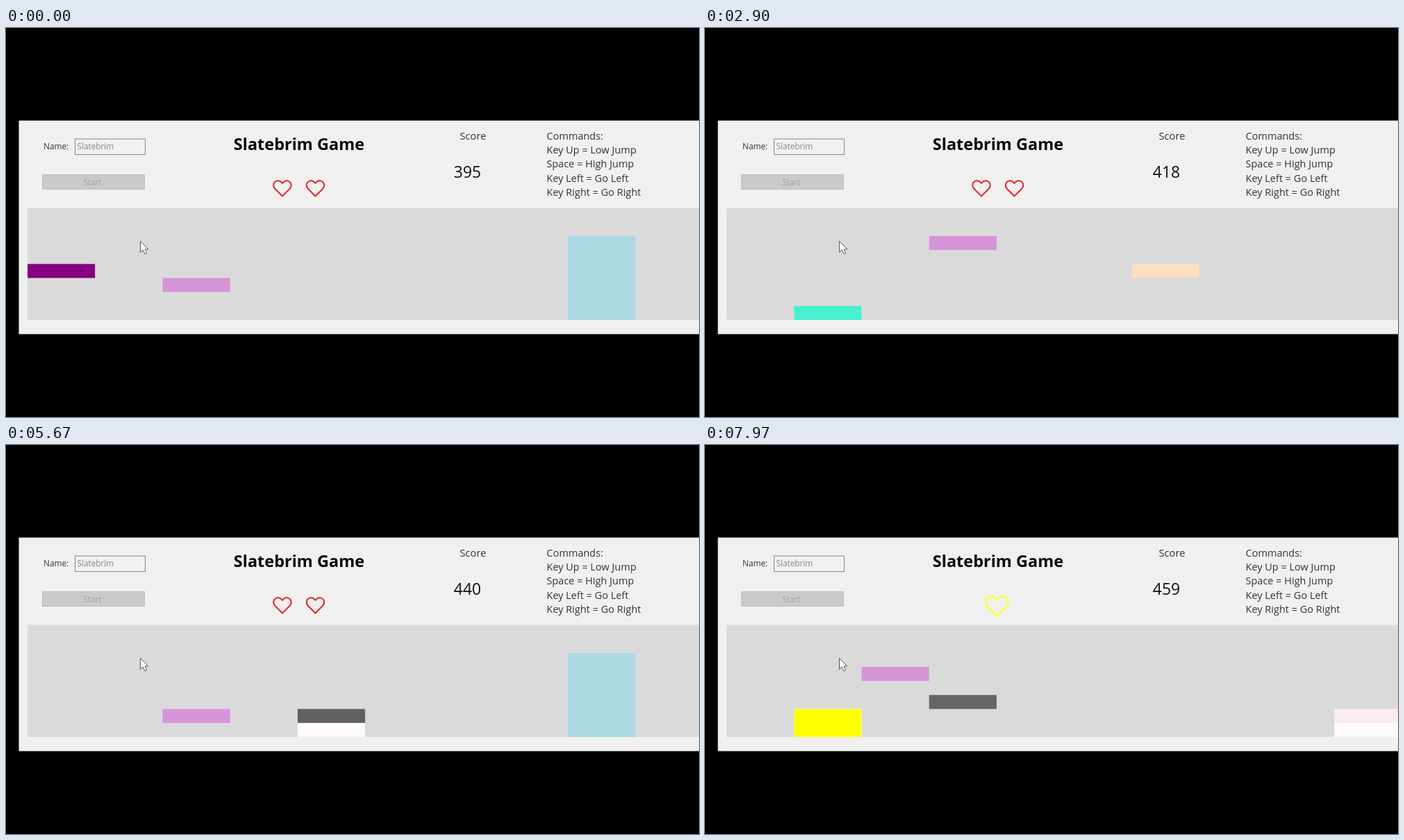
Recreate the animation shown at these times as an HTML page. Size 998 px wide and 561 px high, loop 8000 ms.

```html
<!DOCTYPE html>
<html lang="en">
<head>
<meta charset="utf-8">
<title>Slatebrim Game</title>
<style>
  html, body { margin: 0; width: 100%; height: 100%; overflow: hidden; background: #000; }
  svg { display: block; width: 100%; height: 100%; }
  text { font-family: "Open Sans", "Noto Sans", sans-serif; fill: #333; }
</style>
</head>
<body>
<svg viewBox="0 0 998 561">
  <defs>
    <path id="heart" d="M0 11.5 L-11 .5 C-17 -7 -6.500 -16 0 -7 C6.500 -16 17 -7 11 .5 Z"
      fill="none" stroke-width="2" stroke-linejoin="round"/>
  </defs>
  <rect width="998" height="561"/>
  <rect x="18.500" y="133.500" width="980" height="308" fill="#f0f0f0"/>

  <text x="54" y="175" font-size="11.800">Name:</text>
  <rect x="99.500" y="160" width="101" height="22.500" fill="#f1f1f1" stroke="#858590"/>
  <text x="102.500" y="175" font-size="11.800" style="fill:#858585">Slatebrim</text>
  <rect x="52.500" y="211.500" width="147" height="21" fill="#cacaca" stroke="#bdbdbd"/>
  <text x="124.500" y="227" font-size="11.800" text-anchor="middle" style="fill:#a2a2a2">Start</text>

  <text x="422" y="176" font-size="23.500" font-weight="700" text-anchor="middle" style="fill:#080808">Slatebrim Game</text>
  <g id="pair" stroke="#e0242c">
    <use href="#heart" x="398" y="231"/>
    <use href="#heart" x="445.500" y="231"/>
  </g>
  <use id="last" href="#heart" transform="translate(420.500 232) scale(1.270)" stroke="#ff3"/>

  <text x="672.500" y="161" font-size="14.800" text-anchor="middle">Score</text>
  <text id="score" x="664.500" y="215.500" font-size="23" text-anchor="middle" style="fill:#111"></text>
  <g id="help" font-size="14.500"></g>

  <rect x="31" y="259.500" width="967" height="161.500" fill="#dadada"/>
  <g id="blocks"></g>
  <rect id="player" width="97.200" height="20.200" fill="#d694d9"/>
  <path d="M193.500 307.500 V323.500 L197.200 320 L200 326 L202.700 324.800 L200 319 H204.800 Z"
    fill="#fff" stroke="#555" stroke-width="1"/>
</svg>
<script>
const $ = id => document.getElementById(id);
const LOOP = 8000, TICK = 125, FLOOR = 7;
const colX = c => 31 + c * 97.25;
const rowY = r => 259.5 + r * 20.2;

function add(parent, name, attrs) {
  const el = document.createElementNS("http://www.w3.org/2000/svg", name);
  for (const key in attrs) el.setAttribute(key, attrs[key]);
  return parent.appendChild(el);
}

["Commands:", "Key Up = Low Jump", "Space = High Jump", "Key Left = Go Left", "Key Right = Go Right"]
  .forEach((line, i) => {
    add($("help"), "text", { x: 778.5, y: 160.8 + i * 20.3 }).textContent = line;
  });

// [tick at the left edge, top row, height in rows, colour]
const blocks = [
  [0, 4, 1, "#85007f"],
  [8, 2, 6, "#acd9e2"],
  [17, 2, 4, "#ff0"],
  [24, 7, 1, "#49efcf"],
  [29, 4, 1, "#fbe0bf"],
  [38, 7, 1, "#b2860d"],
  [49, 6, 1, "#606260"],
  [49, 7, 1, "#fffafa"],
  [53, 2, 6, "#acd9e2"],
  [56, 2, 1, "#ff0"],
  [56, 4, 1, "#b3b3b3"],
  [60, 7, 1, "#e08f77"],
  [65, 6, 2, "#ff0"],
  [67, 5, 1, "#666"],
  [73, 6, 1, "#fdecef"],
  [73, 7, 1, "#fffafa"]
].map(([arrival, row, rows, fill]) => {
  const el = add($("blocks"), "rect", { y: rowY(row), width: 97.2, height: rows * 20.2, fill });
  if (fill === "#ff0") el.setAttribute("stroke", "#f4f4a0");
  return { arrival, el };
});

// [tick of the peak, top row]
const jumps = [[-1, 2], [6.5, -1], [15.06, -1], [23.5, 2], [36, 2], [47.9, 2], [51.5, -1], [59.3, 2], [64.8, 2]];

// [from tick, column]
const moves = [[0, 2], [23, 3], [28, 2], [55, 1], [61, 2]];

function playerRow(beat) {
  const rows = jumps.map(([peak, top]) => Math.max(0, Math.round(top + 2 * Math.abs(beat - peak))));
  return Math.min(FLOOR, ...rows);
}

function draw(time) {
  const beat = time / TICK + 0.5;
  const tick = Math.floor(beat);
  $("score").textContent = 395 + tick;
  for (const { arrival, el } of blocks) {
    const col = arrival - tick;
    el.setAttribute("x", colX(col));
    el.style.display = col >= 0 && col < 10 ? "" : "none";
  }
  const col = moves.filter(([from]) => beat >= from).pop()[1];
  $("player").setAttribute("x", colX(col));
  $("player").setAttribute("y", rowY(playerRow(beat)));
  const hit = tick >= 63;
  $("pair").style.display = hit ? "none" : "";
  $("last").style.display = hit ? "" : "none";
}

const start = performance.now();
function frame() {
  draw((performance.now() - start) % LOOP);
  requestAnimationFrame(frame);
}
draw(0);
requestAnimationFrame(frame);
</script>
</body>
</html>
```
